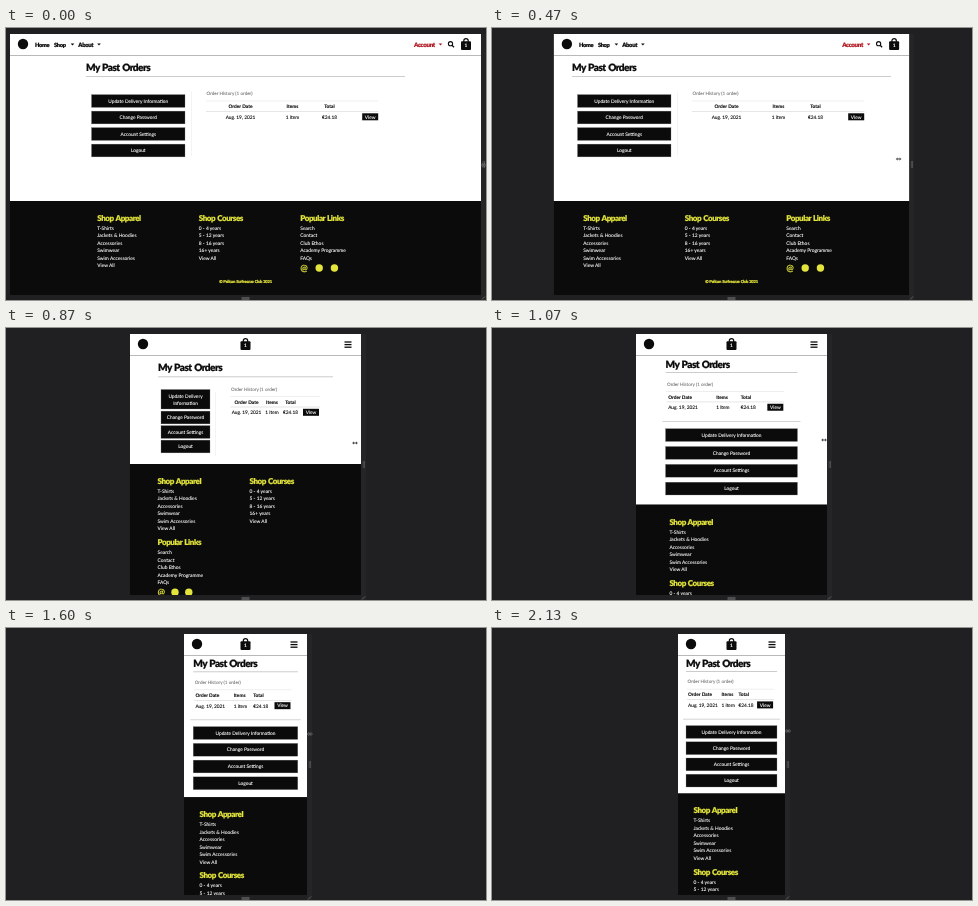
Animation, 480 px wide and 272 px high, one loop 2470 ms. Source, as an HTML page:

```html
<!DOCTYPE html>
<html lang="en">
<head>
<meta charset="utf-8">
<title>Responsive order page</title>
<style>
html, body { margin: 0; height: 100%; overflow: hidden; background: #202022; }
svg { display: block; width: 100vw; height: 100vh; }
text { font-family: Lato, sans-serif; white-space: pre; text-rendering: geometricPrecision; stroke-width: .1px; }
.display { font-weight: 900; letter-spacing: -.055em; word-spacing: .08em; stroke-width: .2px; }
.bold { font-weight: 700; }
</style>
</head>
<body>
<svg id="stage" viewBox="0 0 480 272"></svg>
<script>
const LOOP = 2470, STEP = 66.7, LAST = 32, MID = 239.5, BOTTOM = 267;
const INK = '#0b0b0b', YELLOW = '#e3e53c';
const stage = document.getElementById('stage');

// [step, half width of the viewport]
const widths = [[0, 235.5], [1, 231], [4, 206.5], [8, 168], [9, 156], [13, 115.5],
  [16, 95.5], [20, 74], [24, 61.5], [28, 57], [32, 53.5]];
// [step, cursor x, cursor y]
const pointer = [[0, 477.5, 137], [4, 436, 137], [9, 387, 127], [13, 349, 115],
  [20, 309.5, 108], [28, 298, 104], [32, 296, 103]];

const buttons = ['Update Delivery Information', 'Change Password', 'Account Settings', 'Logout'];
const sections = [
  ['Shop Apparel', 'T-Shirts', 'Jackets & Hoodies', 'Accessories', 'Swimwear', 'Swim Accessories', 'View All'],
  ['Shop Courses', '0 - 4 years', '5 - 12 years', '8 - 16 years', '16+ years', 'View All'],
  ['Popular Links', 'Search', 'Contact', 'Club Ethos', 'Academy Programme', 'FAQs']
];

function at(keys, n, i = 1) {
  const k = Math.max(1, keys.findIndex(key => key[0] >= n));
  const a = keys[k - 1], b = keys[k];
  return a[i] + (b[i] - a[i]) * (n - a[0]) / (b[0] - a[0]);
}

const rect = (x, y, w, h, fill, extra = '') =>
  `<rect x="${x}" y="${y}" width="${w}" height="${h}" fill="${fill}" ${extra}/>`;
const path = (d, fill, extra = '') => `<path d="${d}" fill="${fill}" ${extra}/>`;
const line = (x1, x2, y, color, w = .5) => rect(x1, y - w / 2, x2 - x1, w, color);
const circle = (x, y, r, fill, extra = '') =>
  `<circle cx="${x}" cy="${y}" r="${r}" fill="${fill}" ${extra}/>`;

// y is the middle of the capitals
const text = (s, x, y, { size = 4.8, fill = INK, anchor = 'start', cls = '' } = {}) =>
  `<text x="${x}" y="${y + size * .36}" class="${cls}" fill="${fill}" stroke="${fill}"
    text-anchor="${anchor}" font-size="${size}">${s.replace('&', '&amp;')}</text>`;
const display = (s, x, y, size, fill = INK, anchor) =>
  text(s, x, y, { size, fill, anchor, cls: 'display' });

// Bootstrap-like breakpoints; box = half container, inner = half content
function layoutFor(half) {
  if (half >= 172.4) return { box: 163.8, inner: 159.5, cols: 3, title: 39, history: 65.5,
    split: 185.5, btn: [85.5, 93.5, 73, 16.5], table: [200, 372.5], cells: [-5, 47, 84, 124.7], foot: 173 };
  if (half >= 142.5) return { box: 138, inner: 135, cols: 3, title: 38, history: 62.5,
    split: 193.5, btn: [109, 78, 70, 15.9], table: [208.5, 352.5], cells: [-3, 40.5, 71, 104.7], foot: 173 };
  if (half >= 110.4) return { box: 103.5, inner: 87.5, cols: 2, title: 39.5, history: 61,
    split: 209, btn: [155, 49, 75, 14.5], table: [224.5, 314], cells: [1, 26.5, 45, 65.5], foot: 136 };
  const box = half >= 82.8 ? 77.6 : half, inner = box * .85;
  const k = (box - 53.5) / 20.5, d = inner - 45.5;
  const cells = [-43.5 - .97 * d, -10 - .26 * d, 7 + .11 * d, 33.6 + .5 * d];
  return { box, inner, cols: 1, title: 35.5 + k, history: 53.6 + 2 * k,
    btn: [MID - inner, inner * 2, 104 + 2.6 * k, 16.2 + 1.4 * k],
    table: [MID - inner + 1, MID + cells[3] + 9], cells, foot: 165.5 + 9.5 * k };
}

const caret = (x, fill = INK) => path(`M${x - 1.8} 15.5h3.6l-1.8 2z`, fill);
const bag = x => path(`M${x - 2.2} 14v-1.2a2.2 2.2 0 0 1 4.4 0V14`, 'none', `stroke="${INK}" stroke-width="1.2"`)
  + rect(x - 5, 13.2, 10, 8.8, INK, 'rx="1"')
  + text('1', x, 17.6, { fill: '#fff', anchor: 'middle', cls: 'bold' });

function header(left, right, wide) {
  let s = circle(left + 13, 16, 5.2, INK) + line(left, right, 27.3, '#8a8a8a', .6);
  if (!wide) {
    s += bag(MID);
    for (const y of [14, 16.6, 19.2]) s += line(right - 16.5, right - 9.5, y, INK, 1.3);
    return s;
  }
  const x = right - 30;
  return s + display('Home', left + 25, 16.5, 5.7) + display('Shop', left + 44, 16.5, 5.7) + caret(left + 62.5)
    + display('About', left + 68.3, 16.5, 5.9) + caret(left + 89)
    + display('Account', right - 67, 16.5, 6.2, '#b0141e') + caret(right - 40.5, '#b0141e')
    + circle(x - .5, 15.7, 2.1, 'none', `stroke="${INK}" stroke-width="1.1"`)
    + path(`M${x + 1} 17.2l2 2`, 'none', `stroke="${INK}" stroke-width="1.3"`) + bag(right - 15);
}

function orders(L) {
  const y = L.history, [x1, x2] = L.table, stacked = L.cols == 1;
  const anchor = stacked ? 'start' : 'middle';
  const cell = (s, i, dy, cls) => text(s, MID + L.cells[i], y + dy, { anchor, cls });
  const view = MID + L.cells[3];
  let s = display('My Past Orders', MID - L.inner, L.title, 10)
    + line(MID - L.inner, MID + L.inner, L.title + (stacked ? 8 : 9.4), '#999')
    + text('Order History (1 order)', x1 + .5, y, { size: 4.6, fill: '#777' })
    + line(x1, x2, y + 7.5, '#ddd') + line(x1, x2, y + 18, '#ccc');
  ['Order Date', 'Items', 'Total'].forEach((t, i) => s += cell(t, i, 13, 'bold'));
  ['Aug. 19, 2021', '1 item', '€24.18'].forEach((t, i) => s += cell(t, i, 23.5));
  s += rect(view - 8, y + 19.8, 16, 7, INK)
    + text('View', view, y + 23.3, { fill: '#fff', anchor: 'middle' });
  return s + (stacked ? line(MID - L.inner - 3, MID + L.inner + 3, y + 37.5, '#aaa')
    : rect(L.split, 64, .5, 64, '#e8e8e8'));
}

function menu({ btn: [x, w, y, gap], cols }) {
  return buttons.map((label, i) => {
    const cy = y + gap * i, tall = cols == 2 && i == 0;
    const top = tall ? 61.5 : cy - 6.4, h = tall ? 19.5 : 12.8;
    const words = tall ? ['Update Delivery', 'Information'] : [label];
    return rect(x, top, w, h, INK, 'stroke="#777" stroke-width=".3"')
      + words.map((t, j) => text(t, x + w / 2, tall ? 68 + 7 * j : cy,
        { fill: '#fff', anchor: 'middle' })).join('');
  }).join('');
}

function footer(L, left, right) {
  const y = L.foot, colW = (L.box - 11.5) * 2 / L.cols;
  let s = rect(left, y, right - left, BOTTOM - y, INK);
  sections.forEach(([head, ...items], i) => {
    const x = MID - L.box + 15.5 + i % L.cols * colW;
    const top = y + 17 + 61.3 * Math.floor(i / L.cols);
    s += display(head, x, top, 8, YELLOW);
    items.forEach((t, j) => s += text(t, x, top + 10.2 + 7.5 * j, { size: 4.9, fill: '#fff' }));
    if (i == 2) s += text('@', x + 3.7, top + 49.3, { size: 9, fill: YELLOW, anchor: 'middle', cls: 'bold' })
      + [1, 2].map(j => circle(x + 3.7 + colW * .15 * j, top + 50, 3.7, YELLOW)).join('');
  });
  if (L.cols == 3) s += display('© Pelican Surfrescue Club 2021', MID, y + 81, 4.1, YELLOW, 'middle');
  return s;
}

function frame(right) {
  return rect(right, 6, 5, 266, '#252527')
    + rect(right + 1.8, 133, .6, 7, '#666') + rect(right + 3, 133, .6, 7, '#666')
    + rect(MID - 4, 269.6, 8, .6, '#999') + rect(MID - 4, 270.8, 8, .6, '#999')
    + path(`M${right + 1} 271.5l3 -3`, 'none', 'stroke="#888" stroke-width=".6"');
}

function cursor(n) {
  const x = at(pointer, n, 1), y = at(pointer, n, 2);
  return path(`M${x - 2.8} ${y}l1.8-1.5v1h2v-1l1.8 1.5-1.8 1.5v-1h-2v1z`, '#222', 'stroke="#ccc" stroke-width=".3"');
}

let shown = -1;
function tick(now) {
  const n = Math.min(LAST, Math.floor((now % LOOP + 5) / STEP));
  if (n != shown) {
    shown = n;
    const half = at(widths, n), left = MID - half, right = MID + half, L = layoutFor(half);
    stage.innerHTML = `<clipPath id="view">${rect(left, 6, half * 2, BOTTOM - 6, INK)}</clipPath>`
      + frame(right) + rect(left, 6, half * 2, L.foot - 6, '#fff')
      + '<g clip-path="url(#view)">'
      + header(left, right, L.cols == 3) + orders(L) + menu(L) + footer(L, left, right) + '</g>'
      + cursor(n);
  }
  requestAnimationFrame(tick);
}
tick(0);
</script>
</body>
</html>
```
